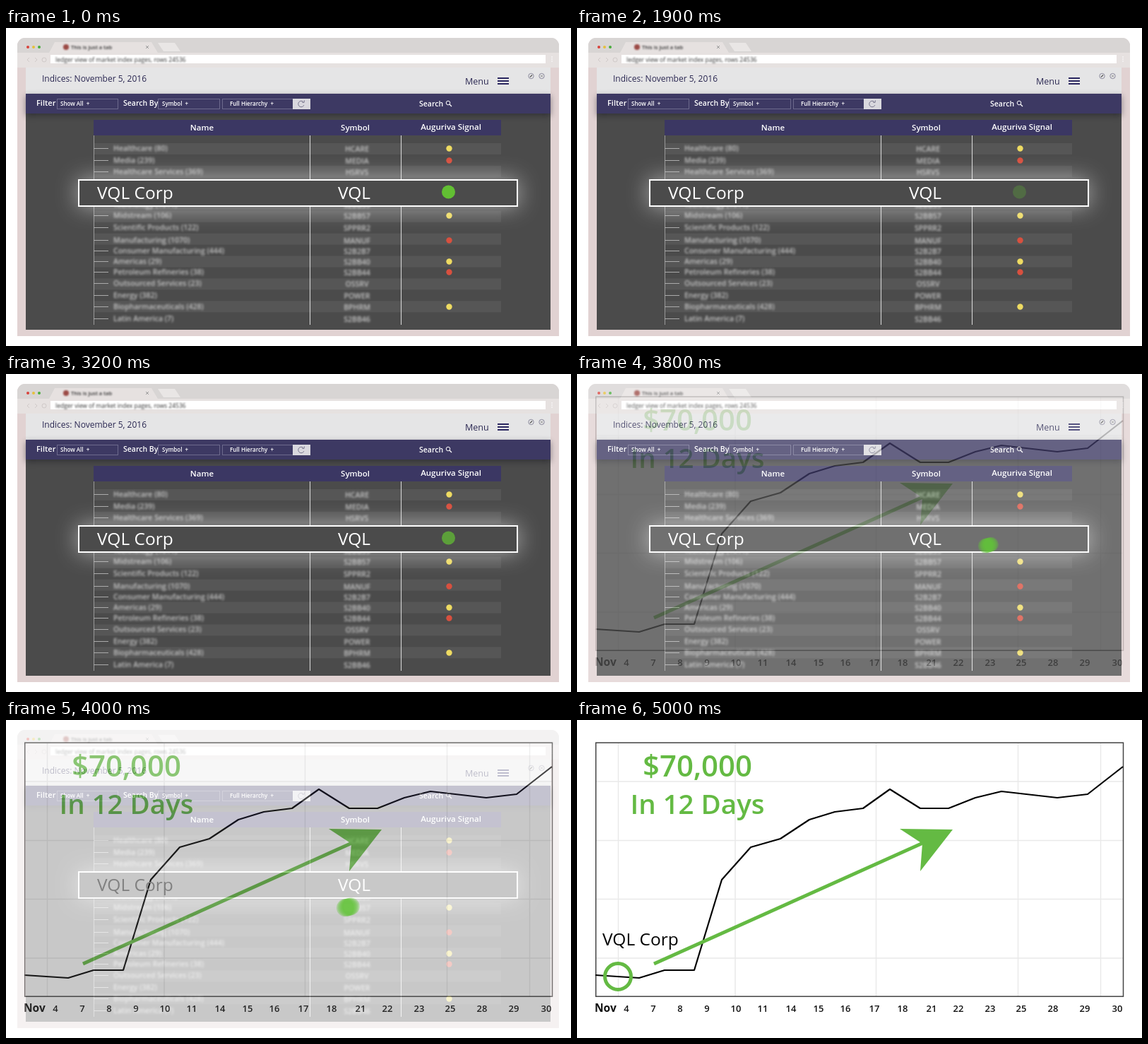
Animation of 800x450 px, one loop 5100 ms. Source, as an HTML page with a canvas:

```html
<!DOCTYPE html>
<html lang="en">
<head>
<meta charset="utf-8">
<title>Market signal</title>
<style>
  html, body { margin: 0; width: 100%; height: 100%; overflow: hidden; background: #fff; }
  canvas { display: block; width: 800px; height: 450px; }
</style>
</head>
<body>
<canvas id="stage" width="800" height="450"></canvas>
<script>
const W = 800, H = 450, LOOP = 5100, STEP = 100;
const GREEN = '#64ba43', NAVY = '#3d3963', DARK = '#4b4b4b';
const COMPANY = 'VQL Corp', TICKER = 'VQL';
const stage = document.getElementById('stage').getContext('2d');

const clamp = v => Math.max(0, Math.min(1, v));
const ramp = (t, from, to) => clamp((t - from) / (to - from));
const mix = (a, b, k) => a + (b - a) * k;

function layer(draw) {
  const canvas = document.createElement('canvas');
  canvas.width = W;
  canvas.height = H;
  draw(canvas.getContext('2d'));
  return canvas;
}
function rect(c, x, y, w, h, color) {
  c.fillStyle = color;
  c.fillRect(x, y, w, h);
}
function text(c, s, x, y, size, color, weight = 400, align = 'left') {
  c.font = `${weight} ${size}px "Open Sans", "Noto Sans", sans-serif`;
  c.textAlign = align;
  c.fillStyle = color;
  c.fillText(s, x, y);
}
function disc(c, x, y, r, color) {
  c.fillStyle = color;
  c.beginPath();
  c.arc(x, y, r, 0, 7);
  c.fill();
}
function ring(c, x, y, r, color, width = 1, from = 0, to = 2 * Math.PI) {
  c.strokeStyle = color;
  c.lineWidth = width;
  c.beginPath();
  c.arc(x, y, r, from, to);
  c.stroke();
}
function path(c, points) {
  c.beginPath();
  points.forEach(([x, y]) => c.lineTo(x, y));
}
function line(c, points, color, width = 1) {
  c.strokeStyle = color;
  c.lineWidth = width;
  path(c, points);
  c.stroke();
}
function shape(c, points, color) {
  c.fillStyle = color;
  path(c, points);
  c.fill();
}
function blurred(c, radius, draw) {
  c.save();
  c.filter = `blur(${radius}px)`;
  draw();
  c.restore();
}

// label, symbol, row centre, signal colour
const YELLOW = '#eedb62', RED = '#d8503f';
const ROWS = [
  ['Healthcare (80)', 'HCARE', 170, YELLOW],
  ['Media (239)', 'MEDIA', 187, RED],
  ['Healthcare Services (369)', 'HSRVS', 203],
  ['Technology (1011)', 'S2BB39', 250],
  ['Midstream (106)', 'S2BB57', 265, YELLOW],
  ['Scientific Products (122)', 'SPPRR2', 282],
  ['Manufacturing (1070)', 'MANUF', 300, RED],
  ['Consumer Manufacturing (444)', 'S2B2B7', 315],
  ['Americas (29)', 'S2BB40', 330, YELLOW],
  ['Petroleum Refineries (38)', 'S2BB44', 345, RED],
  ['Outsourced Services (23)', 'OSSRV', 361],
  ['Energy (382)', 'POWER', 378],
  ['Biopharmaceuticals (428)', 'BPHRM', 394, YELLOW],
  ['Latin America (7)', 'S2BB46', 411]
];

function drawBrowser(c) {
  c.fillStyle = '#e1d2d2';
  c.beginPath();
  c.roundRect(16, 14, 767, 422, [11, 11, 0, 0]);
  c.fill();
  c.fillStyle = '#d8d5d4';
  c.beginPath();
  c.roundRect(16, 14, 767, 24, [11, 11, 0, 0]);
  c.fill();
  rect(c, 16, 35, 767, 21, '#e6e1e0');
  shape(c, [[61, 35], [69, 20], [206, 20], [215, 35]], '#e6e1e0');
  shape(c, [[215, 21], [239, 21], [247, 33], [223, 33]], '#e9e6e5');
  ['#d9433c', '#e5c03c', '#48ad3c'].forEach((color, i) => disc(c, 31 + 8 * i, 27, 2, color));
  line(c, [[198, 25], [202, 29]], '#999');
  line(c, [[202, 25], [198, 29]], '#999');
  line(c, [[33, 42], [30, 45], [33, 48]], '#cfc9c8');
  line(c, [[41, 42], [44, 45], [41, 48]], '#cfc9c8');
  ring(c, 54, 45, 3, '#cfc9c8');
  rect(c, 63, 38, 701, 12, '#fff');
  [41, 44, 47].forEach(y => disc(c, 773, y, .8, '#fff'));
  blurred(c, 1, () => {
    disc(c, 85, 27, 4, '#9b4a45');
    text(c, 'This is just a tab', 92, 30, 7.5, '#333', 600);
    text(c, 'ledger view of market index pages, rows 24536', 70, 48, 8.5, '#333');
  });
}

function drawToolbar(c) {
  rect(c, 28, 56, 743, 37, '#e5e5e6');
  text(c, 'Indices: November 5, 2016', 51, 76, 12, '#2b2852');
  text(c, 'Menu', 650, 80, 12.5, '#2b2852');
  [70, 74, 78].forEach(y => rect(c, 696, y, 16, 2, '#2b2760'));
  [743.5, 758.5].forEach(x => ring(c, x, 68, 3.7, '#77758c', .8));
  line(c, [[742, 69.5], [745, 66.5]], '#555', 1.2);
  line(c, [[757, 66.5], [760, 69.5]], '#777', .8);
  line(c, [[760, 66.5], [757, 69.5]], '#777', .8);

  c.save();
  c.shadowColor = 'rgba(20,20,30,.45)';
  c.shadowBlur = 8;
  c.shadowOffsetY = 3;
  rect(c, 28, 93, 743, 28, NAVY);
  c.restore();
  text(c, 'Filter', 43, 110, 11, '#fff', 600);
  text(c, 'Search By', 166, 110, 10.5, '#fff', 600);
  text(c, 'Search', 585, 111, 10.5, '#fff', 600);
  c.strokeStyle = '#6d6a8d';
  c.lineWidth = 1;
  [[73, 86], [216, 87], [307, 124]].forEach(([x, w]) => c.strokeRect(x - .5, 100.5, w, 14));
  text(c, 'Show All  +', 77, 110, 8, '#fff', 600);
  text(c, 'Symbol  +', 221, 110, 8, '#fff', 600);
  text(c, 'Full Hierarchy  +', 317, 110, 8, '#fff', 600);
  rect(c, 406, 100, 25, 15, '#d9d8de');
  ring(c, 418, 107.5, 4.2, '#77758c', 1, .4, 5.5);
  line(c, [[422.5, 102.5], [422, 105.5], [419, 105]], '#77758c');
  ring(c, 626, 106, 2.8, '#fff');
  line(c, [[628, 108], [631, 111]], '#fff', 1.2);
}

function drawTable(c) {
  for (let i = 0; i < 8; i++) rect(c, 124, 163 + 31.9 * i, 577, 16, '#565656');
  rect(c, 124, 130, 577, 22, '#3b3763');
  text(c, 'Name', 277.5, 145, 11.5, '#fff', 600, 'center');
  text(c, 'Symbol', 494.5, 145, 11.5, '#fff', 600, 'center');
  text(c, 'Auguriva Signal', 630, 144, 11.5, '#fff', 600, 'center');
  line(c, [[124.5, 152], [124.5, 420]], '#999');
  [430.5, 559.5].forEach(x => line(c, [[x, 152], [x, 420]], '#ddd'));
  for (const [label, symbol, y, signal] of ROWS) {
    line(c, [[124, y + .5], [145, y + .5]], '#aaa');
    blurred(c, 1.5, () => {
      text(c, label, 152, y + 4, 10.5, '#c6c6c6', 600);
      text(c, symbol, 497, y + 5, 10.5, '#c6c6c6', 600, 'center');
    });
    if (signal) blurred(c, .7, () => disc(c, 627.5, y + .5, 4.2, signal));
  }
}

const browser = layer(c => {
  drawBrowser(c);
  rect(c, 28, 121, 743, 306, DARK);
  drawToolbar(c);
  drawTable(c);
  c.save();
  c.shadowColor = 'rgba(255,255,255,.55)';
  c.shadowBlur = 32;
  rect(c, 102, 214, 623, 39, DARK);
  c.restore();
  c.strokeStyle = '#fff';
  c.lineWidth = 2;
  c.strokeRect(103, 215, 621, 37);
  text(c, TICKER, 493, 242, 24.5, '#fff', 400, 'center');
});

const PRICES = [
  [26, 361], [88, 365], [124, 354], [166, 354], [205, 226], [246, 180], [288, 168], [329, 141], [365, 130],
  [405, 125], [443, 98], [486, 125], [526, 125], [564, 110], [601, 101], [680, 110], [723, 105], [773, 66]
];
const DAYS = [
  [4, 70], [7, 108], [8, 146], [9, 184], [10, 225], [11, 263], [14, 303], [15, 342], [16, 380],
  [17, 421], [18, 461], [21, 502], [22, 540], [23, 585], [25, 629], [28, 674], [29, 719], [30, 765]
];

const chart = layer(c => {
  rect(c, 0, 0, W, H, '#fff');
  [58.5, 224, 423.5, 624.5, 741.5].forEach(x => line(c, [[x, 32], [x, 391]], '#e9e9e9', 1.5));
  [87, 170.5, 253.5, 337].forEach(y => line(c, [[27, y], [773, y]], '#e9e9e9', 1.5));
  c.strokeStyle = '#444';
  c.lineWidth = 1.5;
  c.strokeRect(26.7, 32.2, 746.8, 359);
  c.lineJoin = 'round';
  line(c, PRICES, '#000', 2.2);
  line(c, [[109, 345], [492, 173]], GREEN, 5);
  shape(c, [[457, 154], [532, 155], [486, 214], [489, 175]], GREEN);
  text(c, '$70,000', 170.5, 80, 42, GREEN, 600, 'center');
  text(c, 'In 12 Days', 170.5, 133, 38.5, GREEN, 600, 'center');
  text(c, 'Nov', 25, 413, 15.5, '#111', 700);
  DAYS.forEach(([day, x]) => text(c, day, x, 413, 13, '#111', 600, 'center'));
});

function drawSignal(c, t) {
  const p = ramp(t, 3710, 4870);
  const x = mix(626.5, 58, p), y = mix(232, 363, p), r = mix(9.5, 21, p);
  if (p === 0) {
    c.globalAlpha = t < 3400 ? .5 + .5 * Math.cos(2 * Math.PI * 3 * t / 3400) : 1;
    disc(c, x, y, r, '#62bf33');
  } else if (p < 1) {
    // motion blur from overlapping copies along the path
    const fill = 1 - ramp(p, .22, .75), edge = ramp(p, .35, .9);
    for (let i = -2; i <= 2; i++) {
      c.globalAlpha = .38 * fill;
      disc(c, x + i * 2, y - i * .46, r, '#62c437');
      c.globalAlpha = .38 * edge;
      ring(c, x + i * 2, y - i * .46, r - 2.5, GREEN, 5);
    }
  } else {
    ring(c, x, y, 18.5, GREEN, 5);
  }
  c.globalAlpha = 1;
}

function render(t) {
  stage.drawImage(chart, 0, 0);
  stage.globalAlpha = 1 - ramp(t, 3715, 4120);
  stage.drawImage(browser, 0, 0);
  stage.globalAlpha = 1;
  const shade = Math.round(255 * (1 - ramp(t, 3850, 4150)));
  const move = ramp(t, 4200, 4870);
  text(stage, COMPANY, mix(129, 36, move), mix(242, 319, move), 24.5, `rgb(${shade},${shade},${shade})`);
  drawSignal(stage, t);
}

function tick() {
  const t = performance.now() % LOOP;
  render(Math.floor(t / STEP) * STEP);
  requestAnimationFrame(tick);
}
tick();
</script>
</body>
</html>
```
